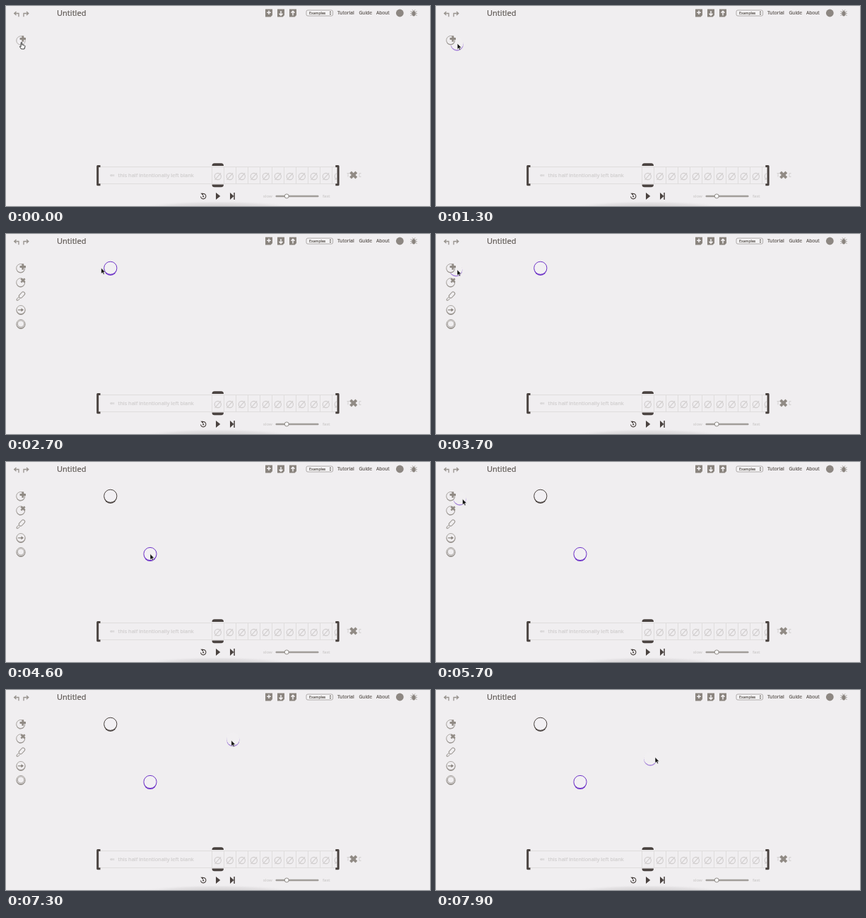
An HTML page that plays this animation: 600 by 284 pixels, repeating every 8000 ms.

```html
<!DOCTYPE html>
<html lang="en">
<head>
<meta charset="utf-8">
<title>Untitled</title>
<style>
  html, body { margin: 0; width: 100%; height: 100%; overflow: hidden; background: #f0eef0; }
  svg { display: block; width: 600px; height: 284px; font-family: "Noto Sans", sans-serif; }
  text { fill: #645e5a; stroke: #645e5a; stroke-width: .2; }
  text.faint { fill: #d0cece; stroke: #d0cece; }
  .menu { font-size: 6.6px; }
  .line { fill: none; stroke: #97928d; }
  .node { color: #4a4340; }
  .node.active { color: #6f35c8; }
  .node circle { stroke: currentColor; }
</style>
</head>
<body>
<svg viewBox="0 0 600 284">
  <defs>
    <radialGradient id="glow">
      <stop offset="0" stop-color="#b5b2b3" stop-opacity=".55"/>
      <stop offset=".65" stop-color="#c4c1c3" stop-opacity=".3"/>
      <stop offset="1" stop-color="#f0eef0" stop-opacity="0"/>
    </radialGradient>
    <clipPath id="tape"><path d="M133 226H468V256H133z"/></clipPath>
    <g id="disc">
      <circle cy="1.500" r="9.100" fill="currentColor"/>
      <circle r="9.100" fill="#f2f0f3"/>
    </g>
    <g id="ring">
      <circle cy="1" r="6" fill="#97928d"/>
      <circle r="6" fill="#f0eef0" stroke="#97928d" stroke-width=".8"/>
    </g>
    <path id="plus" d="M-1.4-4.2H1.4V-1.4H4.2V1.4H1.4V4.2H-1.4V1.4H-4.2V-1.4H-1.4z" fill="#918b85"/>
    <path id="page" d="M-5-5.500H5V3L2.600 5.500H-5z" fill="#8a847e"/>
  </defs>

  <ellipse cx="300" cy="285.500" rx="112" ry="9" fill="url(#glow)"/>

  <!-- header -->
  <g class="line" stroke-width="1.300">
    <path d="M18 15.300V10.500H12M14.500 8L11.700 10.500L14.500 13"/>
    <path d="M25 15.300V10.500H31.500M29 8L31.800 10.500L29 13"/>
  </g>
  <text x="72" y="14" font-size="11">Untitled</text>
  <use href="#page" x="372" y="10"/>
  <use href="#page" x="389" y="10"/>
  <use href="#page" x="406" y="10"/>
  <path d="M372 6.500V12.100M369.200 9.300H374.800M389 7V13M386.500 10.800L389 13.200L391.500 10.800M406 13.500V7.500M403.500 9.700L406 7.300L408.500 9.700"
        fill="none" stroke="#f4f2f3" stroke-width="1.500"/>
  <rect x="425" y="6" width="37.500" height="8" rx="2" fill="#f5f4f5" stroke="#a5a1a0" stroke-width=".9"/>
  <text x="429" y="12" font-size="5.200">Examples</text>
  <path d="M457.500 9.300L459 7.300L460.500 9.300zM457.500 10.700L459 12.700L460.500 10.700z" fill="#645e5a"/>
  <g class="menu">
    <text x="469" y="12.300">Tutorial</text>
    <text x="499.500" y="12.300">Guide</text>
    <text x="524" y="12.300">About</text>
  </g>
  <circle cx="557.300" cy="10" r="5.400" fill="#8d8782"/>
  <g class="line" stroke-width=".9">
    <path d="M572.500 7.500L581.500 13.500M581.500 7.500L572.500 13.500M572.300 10.500H581.700M575 5.300L576.500 7M579 5.300L577.500 7"/>
    <ellipse cx="577" cy="10.700" rx="2.400" ry="3.800" fill="#8b8580" stroke="none"/>
  </g>

  <!-- tape -->
  <g clip-path="url(#tape)" fill="none" stroke="#dfdddd">
    <path d="M133 228.500H468M133 252.500H468" stroke-width="1.200"/>
    <g id="cells"></g>
  </g>
  <text class="faint" x="147" y="243" font-size="8">⇐</text>
  <text class="faint" x="158.500" y="243.300" font-size="7.400">this half intentionally left blank</text>
  <path d="M133.500 227.500H129.700V253.700H133.500M466.300 227.500H470.100V253.700H466.300"
        fill="none" stroke="#4a4340" stroke-width="3" stroke-linejoin="round"/>
  <path d="M291.500 227Q291.500 223.300 295 223.300H304.500Q308 223.300 308 227zM291.500 253.500Q291.500 257.200 295 257.200H304.500Q308 257.200 308 253.500z" fill="#4a4340"/>
  <path d="M482.500 237.500H486M484 237.500V242.500M502.500 237.500H500V242.500H502.500" fill="none" stroke="#d2d0d0"/>
  <use href="#plus" transform="translate(491.700 240) rotate(45) scale(1.400)"/>

  <!-- playback -->
  <g fill="#4a4340">
    <path d="M277 267.200A3.700 3.700 0 1 1 275.500 270.500" fill="none" stroke="#4a4340" stroke-width="1.100"/>
    <path d="M275.300 265.800H279V269.300z"/>
    <circle cx="279.200" cy="270.400" r="1.100"/>
    <path d="M297 265L303.300 270L297 275zM317 265L322.500 270L317 275zM322.300 265H323.800V275H322.300z"/>
  </g>
  <text class="faint" x="364" y="272" font-size="6">slow</text>
  <text class="faint" x="448" y="272" font-size="6">fast</text>
  <rect x="381.700" y="269.200" width="60.600" height="1.800" rx=".9" fill="#a5a09d" stroke="#85807c" stroke-width=".5"/>
  <circle cx="397.200" cy="270" r="3" fill="#fafafa" stroke="#85807c" stroke-width=".9"/>

  <!-- diagram -->
  <g id="first" class="node"><use href="#disc" x="147.800" y="48.300"/><circle cx="147.800" cy="48.300" r="9.100" fill="none"/></g>
  <g id="second" class="node active"><use href="#disc" x="204" y="130.500"/><circle cx="204" cy="130.500" r="9.100" fill="none"/></g>
  <g id="ghost" class="node active" opacity=".58"><use href="#disc"/></g>

  <!-- tools -->
  <circle id="hover" cx="21" cy="49" r="6.200" fill="#f2f0f3" stroke="#aaa6a3" stroke-width=".9"/>
  <use id="addRing" href="#ring" x="20.700" y="48.500"/>
  <use href="#plus" x="23.800" y="46.500"/>
  <g id="tools">
    <use href="#ring" x="20.700" y="68.800"/>
    <use href="#plus" transform="translate(24 66) rotate(45) scale(.9)"/>
    <g class="line">
      <rect x="-5" y="-2.500" width="10" height="5" rx="2.500" transform="translate(22.500 86.500) rotate(-48)"/>
      <path d="M18.500 89.500Q14 92 15 94.200Q17.500 95.500 19.500 91.500"/>
      <use href="#ring" x="21" y="107.500"/>
      <path d="M17 107.800H22" stroke-width="1.400"/>
      <path d="M21.500 105.300L25 107.800L21.500 110.300z" fill="#857f79" stroke="none"/>
      <use href="#ring" x="21" y="127.500"/>
      <circle cx="21" cy="127.500" r="4.600" stroke-width=".8"/>
    </g>
  </g>

  <!-- pointers -->
  <path id="arrow" d="M0 0V8.200L1.900 6.500L3.200 9.300L4.600 8.700L3.300 6H5.800z" fill="#111" stroke="#fff" stroke-width=".5"/>
  <path id="hand" d="M-.8 1Q0-.4.800 1V4L4 4.700Q5.200 5.200 4.900 7L4 10H-.4L-2.600 6.800Q-2.600 5.600-.8 6.600z" fill="#fff" stroke="#222" stroke-width=".9"/>
</svg>
<script>
const $ = id => document.getElementById(id);
const LOOP = 8000, STEP = 100, LAG = 20;

const tool = { x: 22, y: 47 }, grab = { x: 29, y: 53 };
const nodeA = { x: 147.8, y: 48.3 }, nodeB = { x: 204, y: 130.5 };
const hang = { x: 282, y: 56 };

// each move eases to a point; late delays the speed-up, sag bows the way down
const moves = [
  { start: 800, end: 1000, to: grab },
  { start: 1200, end: 2100, to: nodeA, late: 1.4, sag: 7 },
  { start: 2600, end: 3200, to: tool },
  { start: 3400, end: 4300, to: nodeB, late: 2 },
  { start: 4800, end: 5400, to: tool },
  { start: 5600, end: 6700, to: hang, late: .86, sag: 27 }
];
const SWING = 6800;

function ease(u, late) {
  const w = u ** late;
  return w * w * (3 - 2 * w);
}

// a sinking loop that gathers speed
function swing(t) {
  const a = 6.8 * ((t - SWING) / 1100) ** 1.56;
  return { x: hang.x + 43 * Math.sin(a), y: hang.y - 9 * Math.sin(a) + 46 * Math.sin(a / 4) };
}

function at(t) {
  if (t > SWING) return swing(t);
  let p = { x: 22, y: 51 };
  for (const { start, end, to, late = 1, sag = 0 } of moves) {
    if (t < start) break;
    const s = ease(Math.min(1, (t - start) / (end - start)), late);
    p = {
      x: p.x + (to.x - p.x) * s,
      y: p.y + (to.y - p.y) * s + sag * Math.sin(Math.PI * s)
    };
  }
  return p;
}

const show = (el, on) => { el.style.display = on ? "" : "none"; };
const place = (el, p) =>
  el.setAttribute("transform", `translate(${p.x.toFixed(2)} ${p.y.toFixed(2)})`);
const within = (t, spans) => spans.some(([a, b]) => t >= a && t < b);

const drags = [[900, 2300], [3500, 4600], [5700, LOOP]];
const hovers = [[0, 100], [3200, 3500], [5400, 5700]];

let cells = "";
for (let x = 291.5; x < 468; x += 17) {
  cells += `<path d="M${x} 228V253"/>
    <g stroke="#cfcccc" stroke-width="1.100">
      <circle cx="${x + 8.3}" cy="242" r="4.600"/>
      <path d="M${x + 4} 246.800L${x + 12.6} 237.200"/>
    </g>`;
}
$("cells").innerHTML = cells;

function draw(t) {
  const hand = within(t, hovers), tip = at(t + LAG);
  show($("hand"), hand);
  show($("arrow"), !hand);
  place($("hand"), tip);
  place($("arrow"), tip);
  show($("hover"), t < 100);
  show($("addRing"), t >= 100);
  show($("ghost"), within(t, drags));
  place($("ghost"), at(t));
  show($("first"), t >= 2300);
  $("first").classList.toggle("active", t < 4600);
  show($("second"), t >= 4600);
  $("tools").style.opacity = Math.max(0, Math.min(1, (t - 2200) / 200));
}

function tick() {
  const t = performance.now() % LOOP;
  draw(Math.floor(t / STEP) * STEP);
  requestAnimationFrame(tick);
}
tick();
</script>
</body>
</html>
```
